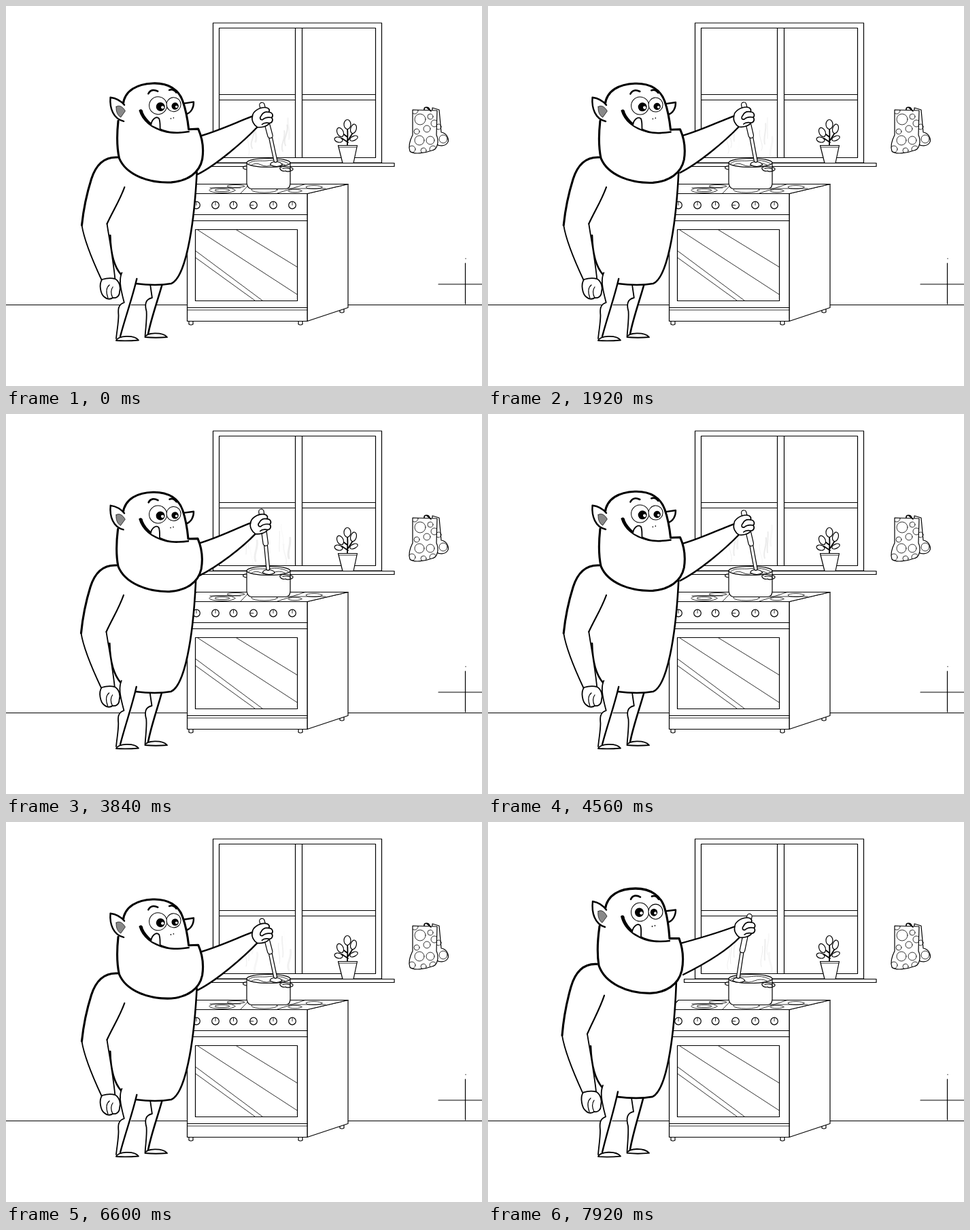
Write an HTML page that moves like this. It is 700 px wide and 560 px high and loops after 8000 ms.

```html
<!DOCTYPE html>
<html lang="en">
<head>
<meta charset="utf-8">
<title>Stirring the pot</title>
<style>
  html, body { margin: 0; width: 100%; height: 100%; overflow: hidden; background: #fff; }
  svg { display: block; width: 100vw; height: 100vh; }
  .thin { stroke-width: .8; }
  .mid { stroke-width: 1.8; }
  .bold { stroke-width: 3.1; }
  .open { fill: none; }
  .ink { fill: #000; stroke: none; }
  .bare { stroke: none; }
</style>
</head>
<body>
<svg viewBox="0 0 700 560" fill="#fff" stroke="#000" stroke-width="1.2" stroke-linecap="round" stroke-linejoin="round">
  <defs>
    <clipPath id="mittClip"><path d="M598 153L634 154L633 190C637 199 635 212 626 213C616 217 599 219 594 214C591 206 594 198 598 190Z"/></clipPath>
  </defs>

  <path class="open" d="M0 440.5H700"/>
  <path class="open" d="M675.5 379V439M636 410H700M676 372v.3"/>

  <g id="window">
    <path d="M304.5 25H552.5V231H304.5ZM313.5 32.5H543.5V223.5H313.5Z"/>
    <path class="open" d="M425.5 32.5V223M435.5 32.5V223M313.5 130.5H425.5M435.5 130.5H543.5M313.5 138.5H425.5M435.5 138.5H543.5"/>
    <path d="M288.5 231.5H571V236.5H288.5Z"/>
  </g>

  <g id="plant">
    <path class="open" stroke-width="1.8" d="M502 205C502 195 503 188 502 181M503 201L494 195M503 198L510 187M502 193L494 187"/>
    <ellipse cx="502" cy="174.5" rx="5" ry="7"/>
    <ellipse cx="491.5" cy="186" rx="4.500" ry="7" transform="rotate(-25 491.5 186)"/>
    <ellipse cx="511" cy="181" rx="4.200" ry="7" transform="rotate(15 511 181)"/>
    <ellipse cx="489" cy="197" rx="6" ry="3.8" transform="rotate(15 489 197)"/>
    <ellipse cx="511.5" cy="195" rx="6" ry="3.2" transform="rotate(-25 511.5 195)"/>
    <path d="M488.5 205.5H516.5L511 231.5H495Z"/>
    <path class="open thin" d="M489.5 208H515.5"/>
  </g>

  <g id="mitts">
    <path d="M627 150L637 153L640 186C648 187 653 197 649 202C645 207 637 207 632 203L627 185Z"/>
    <g class="thin open"><circle cx="643" cy="196" r="6"/><circle cx="636" cy="178" r="4"/></g>
    <path d="M598 153L634 154L633 190C637 199 635 212 626 213C616 217 599 219 594 214C591 206 594 198 598 190Z"/>
    <g id="dots" class="thin open" clip-path="url(#mittClip)"></g>
    <path class="open" stroke-width="1.6" d="M615 153C614 148 622 148 623 153M619 150L625 155"/>
  </g>

  <g id="stove">
    <path d="M269 465v4q3 2 6 0v-4M430 465v4q3 2 6 0v-4M491 447v4q3 2 6 0v-4"/>
    <path d="M443 276.5L503 262.5V444.5L443 464.5Z"/>
    <path d="M266.5 276.5L280 262.5H503L443 276.5Z"/>
    <g class="thin open">
      <ellipse cx="318" cy="271.5" rx="19" ry="4"/><ellipse cx="318" cy="271.5" rx="11" ry="2"/>
      <ellipse cx="338" cy="265.5" rx="13" ry="2"/><ellipse cx="380" cy="271" rx="19" ry="4"/>
      <ellipse cx="425" cy="272.5" rx="10" ry="2.2"/><ellipse cx="453" cy="267" rx="12" ry="2.5"/>
      <path d="M345 276L358 262.5M399 276L440 262.5M300 268H345M415 269H470"/>
    </g>
    <path d="M266.5 276.5H443V464.5H266.5Z"/>
    <path class="open" d="M266.5 307.5H443M266.5 316.5H443M266.5 444.5H443"/>
    <path class="open thin" d="M266.5 448H443"/>
    <path d="M278.5 329.5H428.5V434.5H278.5Z"/>
    <path class="open thin" d="M339 330L428 384.5M282 330L428 425M279 361L377 434M279 371L366 434"/>
    <g id="knobs"></g>
  </g>

  <g id="pot">
    <path d="M355 236C347 235 346 241 355 241"/>
    <path d="M354 231V261Q355 269.5 362 269.5H411Q418 269 418 261V231Z"/>
    <ellipse cx="386" cy="231" rx="32" ry="6.5"/>
    <path class="open thin" d="M357 232C364 226 376 229 384 228S404 226 415 232M360 235Q367 230 375 234T392 234T410 234"/>
    <path class="open" d="M403 238C409 235 421 237 422 240S413 245 411 243M403 238C402 242 407 244 411 243M407 239.500C412 238 418 239 418 241"/>
  </g>

  <g id="steam" class="open" stroke="#aaa"></g>
  <g id="ladle"></g>
  <g id="arm"></g>

  <g id="body">
    <g id="farLeg">
      <path class="bare" d="M211 408L214 430C204 432 203 440 206 452L204 485L209 484L220 445L229 408Z"/>
      <path class="open mid" d="M211 411L214 430C204 432 203 440 206 450C207 462 205 475 204.5 487"/>
      <path class="open" stroke-width="2.600" d="M228.500 410C222 435 213 460 209 483"/>
      <path class="mid" d="M204.500 488C206 481 230 480 237 488Q220 489.500 204.500 488Z"/>
    </g>
    <path class="bare" d="M160 223C180 215 250 225 277 240C276 330 262 400 242 409C225 412 205 411 189 409C160 398 151 370 150 325L146 270Z"/>
    <path class="open" stroke-width="2.6" d="M151 338C152 365 157 384 168 396M189 409C205 411 225 412 242 409C262 400 274 330 277 245"/>
    <g id="nearLeg">
      <path class="bare" d="M169 393L166 408L173 437C164 441 164 448 165 458L162 490L168 488L182 445L191 402Z"/>
      <path class="open mid" d="M169 393C165 402 166 412 173 437C164 440 164 447 165 456C165 468 163 478 162 490"/>
      <path class="open" stroke-width="2.4" d="M191 402C185 430 174 462 168 487"/>
      <path class="mid" d="M162 493C164 486 188 484 195 492.500Q178 494 162 493Z"/>
    </g>
    <g id="restingArm">
      <path class="bare" d="M160 223C140 222 128 235 122 255C116 275 111 300 109 323C115 350 128 380 139 404L159 402C157 375 150 345 146 321L171 267Z"/>
      <path class="open bold" d="M160 223C140 222 128 235 122 255C116 275 111 300 109 323"/>
      <path class="open mid" d="M109 323C113 347 127 378 139 403M146 321C150 345 156 375 159 402"/>
      <path class="open" stroke-width="2.2" d="M171 267C164 287 155 301 146 321"/>
      <path class="mid" d="M140 403C135 410 138 425 144 429C148 433 154 432 156 430C161 431 166 428 166 421C168 415 166 406 159 402Q150 400 140 403Z"/>
      <path class="open" d="M149 430C146 422 146 415 151 411M156 430C153 424 153 418 156 414"/>
    </g>
  </g>

  <g id="head">
    <path stroke-width="2.4" d="M258 149L276 147C276 155 272 163 263 165"/>
    <path class="bare" d="M172 145C175 125 195 117 217 117C240 117 255 128 260 145C264 158 266 172 267 187H281C287 202 288 217 285 232C280 252 262 263 238 264C205 264 172 250 163 225C159 210 160 185 163 172Z"/>
    <path class="open bold" d="M172 147C175 125 195 117 217 117C240 117 255 128 260 145C264 158 266 172 267 187H281C287 202 288 217 285 232C280 252 262 263 238 264C205 264 172 250 163 225C160 208 161 190 164 170"/>
    <path stroke-width="2.4" d="M174 147C168 139 160 136 154 135C152 151 157 167 172 171"/>
    <path fill="#888" stroke-width=".7" d="M162 149C167 146 172 150 175 156L168 165C163 162 161 155 162 149Z"/>
    <path class="ink" d="M195 156C198 153 201 155 201 159C206 172 219 183 236 188C247 191 258 190 268 189V191.5C255 193 244 193 234 190.5C212 184 199 172 195 156Z"/>
    <path stroke-width="1.8" d="M212 178C213 170 220 165 224 169C226 174 225 180 225 185"/>
    <circle cx="223.5" cy="150" r="13" stroke-width="1"/>
    <circle cx="246.5" cy="149.5" r="10.5" stroke-width="1"/>
    <g id="pupils">
      <circle class="ink" cx="227" cy="152" r="6.5"/><circle class="bare" cx="230" cy="153" r="2.2"/>
      <circle class="ink" cx="248.5" cy="152" r="5.2"/><circle class="bare" cx="250.5" cy="153" r="1.8"/>
    </g>
    <path class="open" stroke-width="2.6" d="M210 132C213 126 219 126 224 129M241 128C246 126 249 129 251 132"/>
    <path class="open" stroke-width="1.6" d="M241.5 170v.2M245.5 169v.2"/>
  </g>
</svg>

<script>
const LOOP = 8000, STEP = 120, STIR = 2180, GROUND = 490;
const el = id => document.getElementById(id);
const mix = (a, b, k) => a.map((v, i) => v + (b[i] - v) * k);
const add = (a, b, k) => a.map((v, i) => v + b[i] * k);
const ease = (t, from, to) => {
  const k = Math.min(1, Math.max(0, (t - from) / (to - from)));
  return k * k * (3 - 2 * k);
};

el('knobs').innerHTML = [280, 308, 334.5, 364, 393, 421].map((x, i) =>
  `<circle cx="${x}" cy="293.5" r="5.3"/><path class="thin" d="M${x} 293.5${i == 3 ? 'h-5' : 'v-5'}"/>`).join('');
el('dots').innerHTML = [[609, 167, 8], [624, 163, 4], [619, 181, 5], [630, 173, 5], [604, 185, 4],
  [608, 198, 7], [624, 198, 6], [597, 211, 5], [614, 213, 4], [628, 211, 5], [601, 154, 5]]
  .map(([x, y, r]) => `<circle cx="${x}" cy="${y}" r="${r}"/>`).join('');

// Dip before the jump, then a rise with a slight overshoot
function liftAt(t) {
  return -4 * ease(t, 6700, 7200) + 12 * ease(t, 7250, 7560)
    + 14 * ease(t, 7500, 7800) - 3 * ease(t, 7800, 7920);
}

function rod(points, width) {
  const d = 'M' + points.join('L');
  return `<path class="open" stroke-width="${width + 2}" d="${d}"/>` +
    `<path class="open" stroke="#fff" stroke-width="${width - .4}" d="${d}"/>`;
}

function drawSteam(t) {
  let wisps = '';
  for (let i = 0; i < 8; i++) {
    const age = (t / 1500 + i * .37) % 1;
    const x = (i % 2 ? 400 : 353) + (i * 7) % 19;
    const y = 228 - age * 38;
    const sway = 5 * Math.sin(t / 400 + i * 2);
    wisps += `<path stroke-width="${1 + i % 3}" opacity="${(.24 * Math.sin(Math.PI * age)).toFixed(3)}" ` +
      `d="M${x} ${y}c${-sway} -9 ${sway} -18 ${sway / 2} -30"/>`;
  }
  el('steam').innerHTML = wisps;
}

function drawArm(u, reach, lift) {
  const hand = add(mix([370, 160], [376.5, 164.5], u), [7, -4], reach);
  const top = add(mix([374, 141], [376.5, 146], u), [10.5, -2], reach);
  const grip = add(mix([372.5, 190], [388.5, 191], u), [1.5, -1], reach);
  const tip = add(mix([370, 228], [396.5, 228], u), [-2, 0], reach);
  el('ladle').innerHTML =
    `<path d="M${tip[0] - 8} 234C${tip[0] - 7} 228 ${tip[0] + 7} 228 ${tip[0] + 10} 234Q${tip[0] + 2} 239 ${tip[0] - 8} 234Z"/>` +
    rod([grip, tip], 4) + rod([top, grip], 6.6);

  const [x, y] = hand;
  const shoulder = mix([277, 190 - lift / 2], [281, 193], u);
  const pit = mix([287, 225], [282, 248], u);
  const upper = `${shoulder}C${shoulder[0] + 30} ${shoulder[1] - 8} ${x - 38} ${y + 7} ${x - 14} ${y - 2}`;
  const lower = `${x - 7} ${y + 14}C${x - 26} ${y + 34} ${pit[0] + 28} ${pit[1] - 14} ${pit}`;
  const fist = 'M-14 -2C-14 -9 -4 -15 4 -15C10 -15 12 -11 10 -8C16 -8 17 -2 14 0C17 3 15 8 11 8C8 13 -1 15 -7 14';
  el('arm').innerHTML =
    `<path class="bare" d="M${upper}L${lower}Z"/>` +
    `<path class="open" stroke-width="2.4" d="M${upper}M${lower}"/>` +
    `<g transform="translate(${x} ${y})" stroke-width="1.7">
      <path class="bare" d="${fist}Z"/>
      <path class="open" d="${fist}M10 -8C5 -9 1 -7 -1 -3M14 0C8 -1 4 0 1 3M11 8C6 7 2 8 0 10M-1 -3C-4 0 -3 4 1 3M-14 -2C-16 4 -12 11 -7 14"/>
    </g>`;
}

function draw(t) {
  const reach = ease(t, 7400, 7900);
  const u = (1 + Math.cos(2 * Math.PI * (t + 30) / STIR)) / 2;
  const tilt = u * (1 - reach);
  const lean = .015 * tilt;
  const lift = liftAt(t);
  const stretch = 1 + lift / 373;
  const rise = GROUND * (1 - stretch);

  el('body').setAttribute('transform', `matrix(1 0 ${-lean} ${stretch} ${lean * GROUND} ${rise})`);
  el('head').setAttribute('transform',
    `matrix(1 0 0 ${stretch} 0 ${rise}) translate(${tilt} ${-3 * tilt}) rotate(${-2.5 * tilt} 215 170)`);
  el('pupils').setAttribute('transform', `translate(${-4.5 * reach} ${-1.5 * reach})`);
  drawArm(tilt, reach, lift);
  drawSteam(t);
}

function tick() {
  const t = performance.now() % LOOP;
  draw(Math.floor(t / STEP) * STEP);
  requestAnimationFrame(tick);
}
tick();
</script>
</body>
</html>
```
